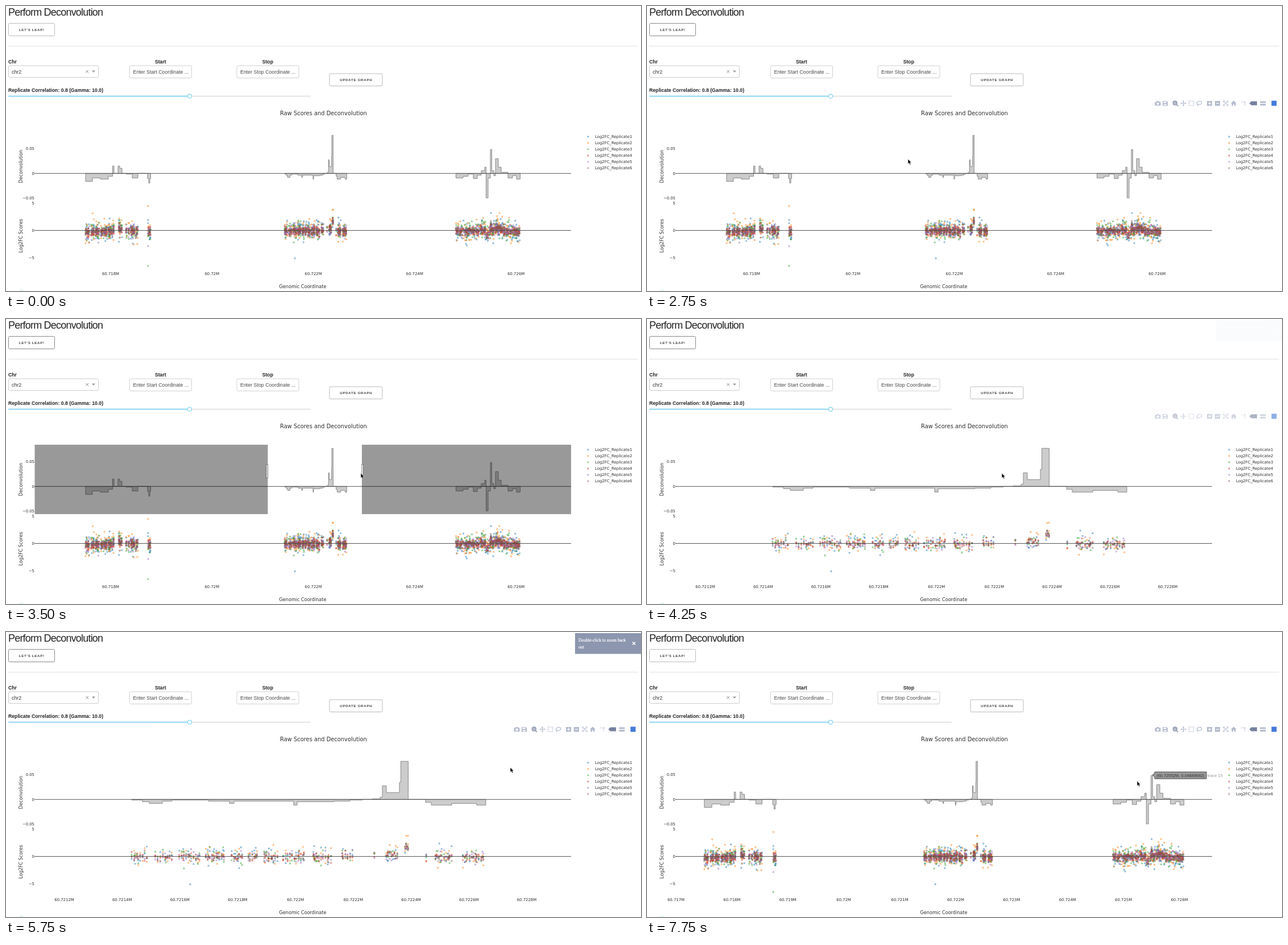
An HTML page for the animation above (8000 ms loop, 1117 by 501 pixels).

```html
<!DOCTYPE html>
<html lang="en">
<head>
<meta charset="utf-8">
<title>Perform Deconvolution</title>
<style>
  html, body { margin: 0; width: 100%; height: 100%; overflow: hidden; background: #fff; }
  svg { display: block; width: 100%; height: 100%; }
  text { white-space: pre; }
  .ui { font-family: "Liberation Sans", Arial, sans-serif; }
  .plot { font-family: "DejaVu Sans", Verdana, sans-serif; fill: #2e2e2e; }
  .serif { font-family: "Liberation Serif", Times, serif; }
</style>
</head>
<body>
<svg id="stage" viewBox="0 0 1117 501"></svg>
<script>
const LOOP = 8000, STEP = 250, ZERO = 294.3, SCORE = 394.5;
const COLORS = ['#1f77b4', '#ff7f0e', '#2ca02c', '#d62728', '#9467bd', '#8c564b'];
const SPREAD = [8.5, 9, 6.5, 3.8, 5, 3.8];
const INK = '#b3bbce', ACTIVE = '#76819f';
const stage = document.getElementById('stage');

function el(parent, tag, attrs, text) {
  const node = document.createElementNS('http://www.w3.org/2000/svg', tag);
  for (const k in attrs) node.setAttribute(k, attrs[k]);
  if (text !== undefined) node.textContent = text;
  parent.appendChild(node);
  return node;
}
const group = (parent = stage) => el(parent, 'g', {});
const path = (p, d, attrs = {}) => el(p, 'path', { d, fill: 'none', ...attrs });
const rect = (p, x, y, width, height, attrs = {}) =>
  el(p, 'rect', { x, y, width, height, ...attrs });
const circle = (p, cx, cy, r, attrs) => el(p, 'circle', { cx, cy, r, ...attrs });
const dot = (p, x, y, k) => circle(p, x, y, 1.65, { fill: COLORS[k], 'fill-opacity': 0.5 });
const label = (p, cls, x, y, size, text, attrs = {}) =>
  el(p, 'text', { class: cls, x, y, 'font-size': size, ...attrs }, text);
const show = (node, on) => { node.style.display = on ? '' : 'none'; };
const MID = { 'text-anchor': 'middle' }, END = { 'text-anchor': 'end' };

let seed = 2718;
function rnd() {
  seed = (seed + 0x6D2B79F5) | 0;
  let v = Math.imul(seed ^ (seed >>> 15), 1 | seed);
  v = (v + Math.imul(v ^ (v >>> 7), 61 | v)) ^ v;
  return ((v ^ (v >>> 14)) >>> 0) / 4294967296;
}
const gauss = () => Math.sqrt(-2 * Math.log(1 - rnd())) * Math.cos(2 * Math.PI * rnd());

// Horizontal scales: kilobase coordinate <-> pixel.
const scale = (g0, x0, k) => ({ x: g => x0 + (g - g0) * k, g: x => g0 + (x - x0) / k });
const WIDE = scale(718, 184, 89.15);
const ZOOM = scale(721.2, 102.5, 508.4);
const AUTO = scale(717, 51, 98.39);

// A region has the plateaus of its curve [x, offset] and scattered guides along it.
function region(on, pitch, gap, plateaus, outliers) {
  const steps = plateaus.map(([x, v]) => [on.g(x), v]);
  const level = g => steps.reduce((v, s) => (s[0] <= g ? s[1] : v), 0);
  const end = steps[steps.length - 1][0], guides = [];
  for (let g = steps[0][0]; g < end; g += gap * (0.5 + rnd())) {
    const stop = Math.min(end, g + 0.01 + 0.07 * rnd());
    for (; g < stop; g += pitch * (0.4 + 1.2 * rnd()) / (level(g) < -10 ? 1.6 : 1))
      if (level(g)) guides.push(g);
  }
  const dots = COLORS.flatMap((_, k) => guides.map(g => [g, SCORE + level(g) * 0.2 + gauss() * SPREAD[k], k]));
  dots.push(...outliers.map(([x, y, k]) => [on.g(x), y, k]));
  return { steps, dots };
}
const left = region(WIDE, 0.006, 0.022,
  [[140, 14], [152, 8], [166, 10], [180, 5], [187.5, -13], [190, 0], [197, -13], [200, -9], [204, 0],
    [211, 1], [222, 8], [232, 0], [249, 9], [251, 17], [253, 9], [254.5, 0]],
  [[250, 351.5, 1], [250, 376, 0], [250, 457, 2], [250, 422, 4]]);
const center = region(ZOOM, 0.0058, 0.024,
  [[221, 1], [240, 4], [252, 7], [275, 3], [292, 1], [356, 3], [393, 7], [401, 3], [506, 10], [512, 4],
    [577, 3], [605, 1], [627, 0], [644, -1], [658, -4], [662, -24], [669, -12], [692, -30], [694.5, -67],
    [707.5, 0], [738, 5], [748, 10], [784, 7], [828, 10], [844, 0]],
  [[324, 443.5, 0], [707, 358, 1]]);
const right = region(WIDE, 0.0068, 0.01,
  [[791.5, 8], [804, 5], [813, 1], [822, 9], [829, 3], [836, -5], [842, -11], [844.5, 43], [848, 8],
    [852, -42], [854.5, -5], [858, 4], [861, -26], [866, -11], [871, -2], [883, 8], [891, 4], [898, 10], [904.5, 0]],
  [[853, 364, 0], [868, 364, 1]]);

function buildView(view, regions, from, to, by) {
  const root = group();
  for (const { steps } of regions) {
    let d = `M${view.x(steps[0][0]).toFixed(1)} ${ZERO}`;
    for (const [g, v] of steps) d += `H${view.x(g).toFixed(1)}V${ZERO + v}`;
    path(root, d + 'Z', { fill: '#7f7f7f', 'fill-opacity': 0.4, stroke: '#8a8a8a' });
  }
  const dots = regions.flatMap(r => r.dots).sort((a, b) => a[2] - b[2]);
  for (const [g, y, k] of dots) dot(root, view.x(g).toFixed(1), y.toFixed(1), k);
  for (let g = from; g < to + by / 2; g += by)
    label(root, 'plot', view.x(g), 473, 6.9, `${+(60 + g / 1000).toFixed(4)}M`, MID);
  return root;
}

function buildForm() {
  const form = group(), bold = { 'font-weight': 'bold', fill: '#222' };
  const frame = (x, y, w, h, stroke) => rect(form, x, y, w, h, { rx: 2, fill: '#fff', stroke });
  const button = (x, y, w, h, text) => {
    const box = frame(x, y, w, h, '#bbb');
    label(form, 'ui', x + w / 2 + 0.3, y + h / 2 + 2.3, 6.2, text,
      { ...MID, 'font-weight': 600, 'letter-spacing': 0.67, fill: '#444' });
    return box;
  };
  label(form, 'ui', 4, 17, 18, 'Perform Deconvolution', { 'letter-spacing': -0.8, fill: '#222' });
  const start = button(4.5, 30.5, 81, 22, "LET'S LEAP!");
  button(569, 119, 93, 21.5, 'UPDATE GRAPH');
  path(form, 'M4 70.5H1112', { stroke: '#e1e1e1' });

  label(form, 'ui', 4, 101, 8.7, 'Chr', bold);
  frame(4.5, 105, 158, 20.5, '#ccc');
  label(form, 'ui', 10, 118.5, 8.85, 'chr2', { fill: '#333' });
  path(form, 'M140.5 113l4.5 4.5m0-4.5l-4.5 4.5', { stroke: '#888' });
  path(form, 'M151 113.5h6l-3 3.5z', { fill: '#999' });
  for (const [x, what] of [[217.5, 'Start'], [406, 'Stop']]) {
    label(form, 'ui', x + 54.3, 101, 8.7, what, { ...bold, ...MID });
    frame(x, 105, 109, 21.5, '#d1d1d1');
    label(form, 'ui', x + 6, 118.5, 8.85, `Enter ${what} Coordinate ...`, { fill: '#4a4a4a' });
  }
  label(form, 'ui', 4, 151, 8.7, 'Replicate Correlation: 0.8 (Gamma: 10.0)', bold);
  rect(form, 4, 157.5, 532, 2.3, { rx: 1, fill: '#e6e6e6' });
  rect(form, 4, 157.5, 319, 2.3, { rx: 1, fill: '#9bddf8' });
  circle(form, 323, 158.7, 3.5, { fill: '#fff', stroke: '#85d5f5', 'stroke-width': 1.2 });
  circle(form, 27, 503, 4, { fill: 'none', stroke: '#cdeee6' });
  return start;
}

function buildAxes() {
  const axes = group();
  label(axes, 'plot', 558.5, 192, 9.9, 'Raw Scores and Deconvolution', MID);
  label(axes, 'plot', 522, 495.5, 8.1, 'Genomic Coordinate', MID);
  for (const [y, text] of [[282, 'Deconvolution'], [404, 'Log2FC Scores']])
    label(axes, 'plot', 0, 0, 8.1, text, { ...MID, transform: `translate(29 ${y}) rotate(-90)` });
  [['0.05', '0', '−0.05'], ['5', '0', '−5']].forEach((names, row) => names.forEach((text, i) =>
    label(axes, 'plot', 50, row ? 349 + 48 * i : 253.2 + 43.6 * i, 6.9, text, END)));
  COLORS.forEach((_, i) => {
    const y = 229.7 + i * 11.05;
    dot(axes, 1024, y, i);
    label(axes, 'plot', 1036, y + 2.5, 6.93, `Log2FC_Replicate${i + 1}`);
  });
}

function buildBar() {
  const bar = group();
  const solid = (d, fill = INK) => path(bar, d, { fill, 'fill-rule': 'evenodd' });
  const line = (d, stroke = INK, more = {}) => path(bar, d, { stroke, 'stroke-width': 1.2, ...more });
  const dashed = { 'stroke-dasharray': '1.6 1' };
  // camera, disk
  solid('M893.5 168.5h2.5l1-1.5h3l1 1.5h2.5v6.5h-10zM898.5 169.5a2.2 2.2 0 1 0 .1 0z');
  solid('M907 167h7l2 2v6.5h-9zM908.5 168v2.5h5v-2.5zM909 172.5v2h5v-2z');
  // zoom, pan, box, lasso
  line('M931.5 173.5l2.5 2.5M926.8 170.5h4m-2-2v4', ACTIVE);
  circle(bar, 928.8, 170.5, 3.3, { fill: 'none', stroke: ACTIVE, 'stroke-width': 1.5 });
  line('M939 171h9M943.5 166.5v9');
  solid('M938.5 171l2-2v4zM948.5 171l-2-2v4zM943.5 166l-2 2h4zM943.5 176l-2-2h4z');
  line('M953.5 167h8v8h-8z', INK, dashed);
  line('M969 174c-3-1-2-6 3-6.5s5 5 0 5.5c-3 .3-4-1.5-3 3');
  // zoom in, zoom out, autoscale, home
  solid('M985 167h9v8.5h-9zM989 168.5v2h-2v1.3h2v2h1.3v-2h2v-1.3h-2v-2z');
  solid('M999 167h9v8.5h-9zM1001 170.5v1.3h5v-1.3z');
  const fit = line('M1014 169.5v-2.5h2.5M1019.5 167h2.5v2.5M1022 172.5v2.5h-2.5M1016.5 175h-2.5v-2.5M1015.5 168.5l5 5m0-5l-5 5');
  solid('M1032 166.5l5 4.5h-1.5v4.5h-2.5v-3h-2v3h-2.5v-4.5h-1.5z');
  // spike lines, hover modes
  line('M1045 168.5h5M1051.5 170v5.5', INK, dashed);
  solid('M1050.5 167.5h2v2h-2z');
  solid('M1059.5 171l3.5-3.5h10v7h-10z', ACTIVE);
  solid('M1078.5 167.5h10v3h-10zM1078.5 172h10v3h-10z');
  rect(bar, 1098.5, 166.5, 9, 9, { fill: '#447adb' });
  return { bar, fit };
}

function buildNotice() {
  const g = group(), white = { fill: '#fff', stroke: '#fff', 'stroke-width': 0.2 };
  rect(g, 1001, 2, 116, 36.5, { fill: '#8c97af' });
  label(g, 'serif', 1007, 17, 7.7, 'Double-click to zoom back', white);
  label(g, 'serif', 1007, 29, 7.7, 'out', white);
  path(g, 'M1102 17.5l5 5m0-5l-5 5', { stroke: '#fff', 'stroke-width': 1.5 });
  return g;
}

function buildTip() {
  const g = group();
  rect(g, 983.5, 179.5, 45, 15.7, { rx: 1.5, fill: '#5a6480' });
  label(g, 'ui', 1006, 190, 7.1, 'Autoscale', { ...MID, fill: '#fff', 'font-weight': 'bold' });
  return g;
}

function buildHover() {
  const g = group();
  path(g, 'M889 251.5l4-3v-2.5h91v12h-91v-3.5z', { fill: '#999', stroke: '#444' });
  label(g, 'ui', 938.5, 254.5, 7.35, '(60.72552M, 0.04889682)', { ...MID, fill: '#333' });
  label(g, 'ui', 986, 254.5, 7.35, 'trace 15', { fill: '#999' });
  return g;
}

const startButton = buildForm();
buildAxes();
const views = [
  buildView(WIDE, [left, center, right], 718, 726, 2),
  buildView(ZOOM, [center], 721.2, 722.8, 0.2),
  buildView(AUTO, [left, center, right], 717, 726, 1)
];
for (const y of [ZERO, SCORE]) path(stage, `M50 ${y}H994`, { stroke: '#444', 'stroke-width': 0.9 });

const shade = group();
const dim = { fill: '#000', 'fill-opacity': 0.4 };
const handle = { fill: '#fff', stroke: '#555', 'stroke-width': 0.8 };
rect(shade, 50.5, 221, 410, 122, dim);
rect(shade, 458, 255.5, 2.5, 24, handle);
const rest = rect(shade, 0, 221, 0, 122, dim);
const grip = rect(shade, 0, 255.5, 2.5, 24, handle);

const { bar, fit } = buildBar();
const notice = buildNotice(), tip = buildTip(), hover = buildHover();
const cursor = path(stage, 'M0 0V8.5L2 6.8L3.4 10L5 9.3L3.6 6.2H6.2Z',
  { fill: '#000', stroke: '#fff', 'stroke-width': 0.6 });

// Pointer route: time, x, y.
const route = [[500, 893, 148], [1500, 376, 43], [2750, 459, 269], [3000, 480, 271], [3500, 624, 271],
  [4250, 624, 271], [5250, 615, 295], [5750, 887, 238], [6500, 1014, 176], [7250, 1010, 178], [7750, 862, 262]];
function pointer(t) {
  const i = Math.max(1, route.findIndex(p => p[0] >= t));
  const [[t0, x0, y0], [t1, x1, y1]] = [route[i - 1], route[i]];
  const f = Math.max(0, (t - t0) / (t1 - t0));
  return [x0 + (x1 - x0) * f, y0 + (y1 - y0) * f];
}

function draw(t) {
  const [x, y] = pointer(t);
  const within = (a, b) => t >= a && t < b;
  show(cursor, t >= 500);
  cursor.setAttribute('transform', `translate(${x.toFixed(1)} ${y.toFixed(1)})`);
  startButton.setAttribute('stroke', within(750, 6750) ? '#888' : '#bbb');

  const view = t < 4250 ? 0 : t < 7250 ? 1 : 2;
  views.forEach((v, i) => show(v, i === view));

  const edge = x + 2;
  show(shade, within(3000, 4250));
  rest.setAttribute('x', edge);
  rest.setAttribute('width', Math.max(0, 994 - edge));
  grip.setAttribute('x', edge);

  show(bar, within(2250, 3000) || t >= 4250);
  bar.setAttribute('opacity', t === 4250 ? 0.6 : 1);
  fit.setAttribute('stroke', within(6500, 7250) ? ACTIVE : INK);

  show(notice, within(4250, 7250));
  notice.setAttribute('opacity', Math.min(1, 0.03 + (t - 4250) / 700));
  show(tip, within(6750, 7250));
  show(hover, t >= 7750);
}

const begin = performance.now();
let last = -1;
function tick() {
  const t = Math.floor(((performance.now() - begin) % LOOP) / STEP) * STEP;
  if (t !== last) draw(last = t);
  requestAnimationFrame(tick);
}
tick();
</script>
</body>
</html>
```
